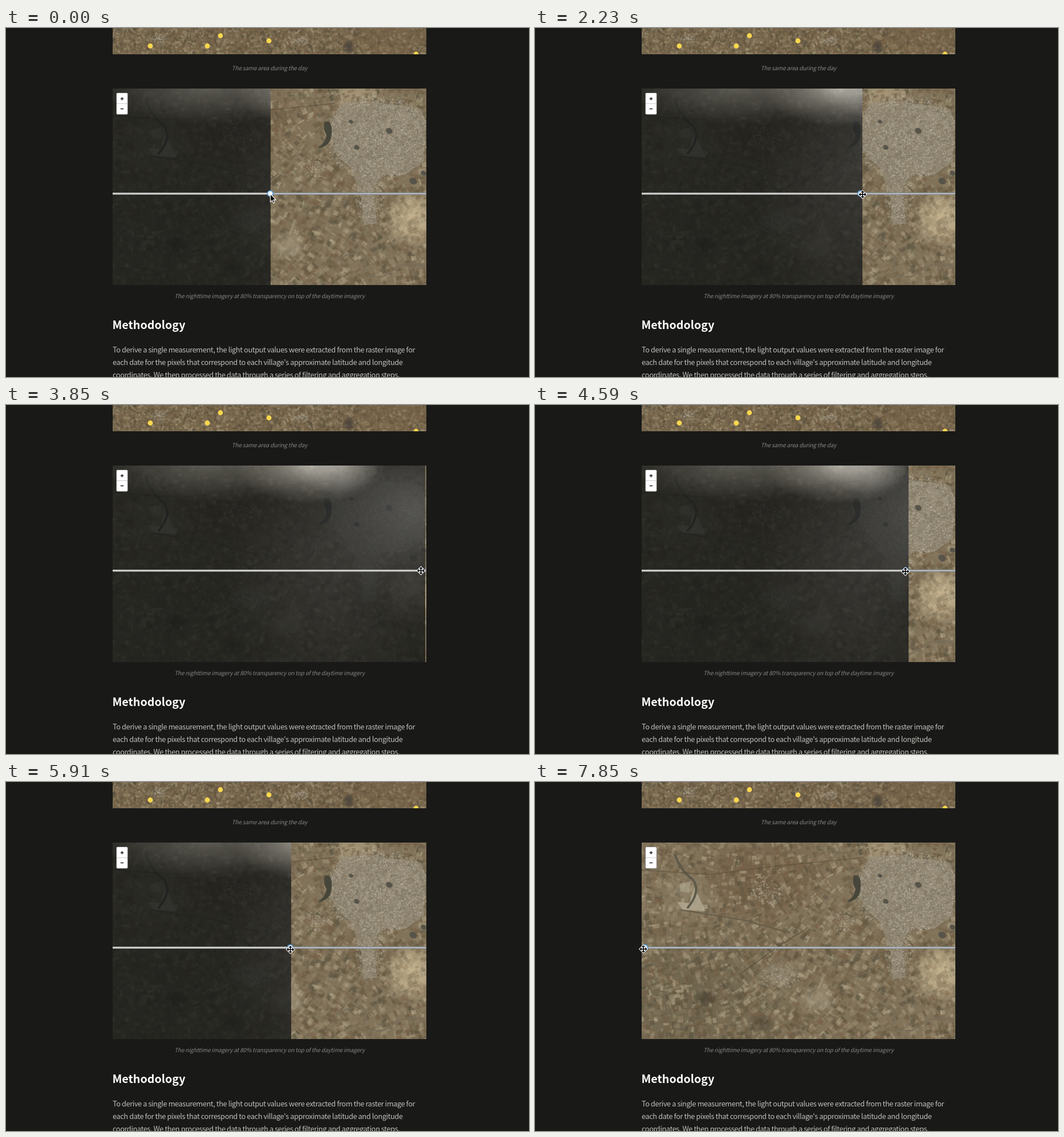
An HTML page with a canvas that plays this animation: 917 px wide and 611 px high, repeating every 8000 ms.

```html
<!DOCTYPE html>
<html lang="en">
<head>
<meta charset="utf-8">
<title>Imagery comparison</title>
<style>
html, body { margin: 0; width: 100%; height: 100%; overflow: hidden; background: #191917; }
canvas, #night, svg { position: absolute; }
#strip { left: 187px; top: 0; }
#day, #night { left: 187px; top: 106px; width: 550px; height: 344px; }
#night {
  opacity: .8;
  background:
    radial-gradient(80px 56px at 390px -6px, rgba(255,255,250,.45), rgba(255,255,250,.2) 50%, transparent),
    radial-gradient(135px 72px at 345px -4px, rgba(215,212,205,.8), rgba(190,187,180,.4) 50%, transparent),
    radial-gradient(190px 68px at 170px -4px, rgba(140,140,135,.55), rgba(110,110,106,.3) 60%, transparent),
    radial-gradient(190px 170px at 530px 80px, rgba(92,93,95,.72), rgba(80,80,82,.35) 55%, transparent),
    radial-gradient(180px 220px at 380px 180px, rgba(70,70,72,.4), transparent),
    #131616;
}
svg { left: 0; top: 0; }
text { font-family: "Noto Sans CJK SC", "Noto Sans CJK JP", "Noto Sans", sans-serif; }
.caption { font-size: 10px; letter-spacing: -.17px; font-style: italic; fill: #858580; text-anchor: middle; }
.body { font-size: 12.8px; letter-spacing: -.42px; font-weight: 300; fill: #bdbdb9; }
</style>
</head>
<body>
<canvas id="strip" width="550" height="46"></canvas>
<canvas id="day" width="550" height="344"></canvas>
<div id="night"></div>
<svg width="917" height="611" viewBox="0 0 917 611">
  <clipPath id="stripBox"><rect x="187" width="550" height="46"/></clipPath>
  <clipPath id="trackBox"><rect x="187" y="280" width="549.5" height="20"/></clipPath>
  <g id="villages" fill="#fad84f" clip-path="url(#stripBox)"></g>

  <text class="caption" x="462" y="73.5">The same area during the day</text>
  <text class="caption" x="462" y="472.5">The nighttime imagery at 80% transparency on top of the daytime imagery</text>
  <text x="186.5" y="527" font-size="19.7" font-weight="700" fill="#fff">Methodology</text>
  <g class="body">
    <text x="187" y="568">To derive a single measurement, the light output values were extracted from the raster image for</text>
    <text x="187" y="590">each date for the pixels that correspond to each village's approximate latitude and longitude</text>
    <text x="187" y="612">coordinates. We then processed the data through a series of filtering and aggregation steps.</text>
  </g>

  <rect x="193.5" y="113.5" width="20" height="38" rx="2" fill="#fff" stroke="#000" stroke-opacity=".35"/>
  <path d="M194 132.5h19" stroke="#ccc"/>
  <path d="M200.8 123.8h5.4M203.5 121.1v5.4M200.8 141.5h5.4" stroke="#222" stroke-width="1.5"/>

  <g clip-path="url(#trackBox)">
    <rect x="187" y="288" width="550" height="4" fill="#8e8e8c"/>
    <rect x="187" y="289" width="550" height="2" fill="#d2d2d0"/>
    <g id="rest">
      <rect y="288" width="550" height="4" fill="#85888b"/>
      <rect y="289" width="550" height="2" fill="#b4bac2"/>
    </g>
  </g>
  <g id="thumb">
    <circle r="6" fill="#4f93d6" opacity=".55"/>
    <circle id="knob" r="4.6" stroke="#5b9fe0" stroke-width="1.2"/>
  </g>
  <path id="arrow" d="M463.5 290.5v14.2l3.2-3 2.1 4.9 2.3-1-2.1-4.7h4.3z" fill="#000" stroke="#fff" stroke-width="1.1"/>
  <path id="move" d="M-6.6 0l3.2-3.2v2.4h2.6v-2.6h-2.4L0-6.6l3.2 3.2H.8v2.6h2.6v-2.4L6.6 0 3.4 3.2V.8H.8v2.6h2.4L0 6.6l-3.2-3.2h2.4V.8h-2.6v2.4z"
    fill="#000" stroke="#fff" stroke-width="2" paint-order="stroke"/>
</svg>
<script>
const $ = id => document.getElementById(id);

function random(seed) {
  return () => (seed = seed * 16807 % 2147483647) / 2147483647;
}

function fields(g, w, h, count, size, colors, seed) {
  const rnd = random(seed);
  for (let i = 0; i < count; i++) {
    const x = rnd() * w, y = rnd() * h;
    const turn = .45 * Math.sin(x / 90 + 1) + .4 * Math.cos(y / 70) - .35;
    const a = size * (.4 + rnd()), b = size * (.25 + rnd() * .6);
    g.save();
    g.translate(x, y);
    g.rotate(turn + (rnd() < .5 ? Math.PI / 2 : 0));
    g.globalAlpha = .2 + rnd() * .4;
    g.fillStyle = colors[Math.floor(rnd() * colors.length)];
    g.fillRect(-a / 2, -b / 2, a, b);
    g.restore();
  }
}

// Small marks, denser towards the middle of an ellipse.
function speckle(g, x, y, rx, ry, count, colors, seed) {
  const rnd = random(seed);
  g.globalAlpha = .45;
  for (let i = 0; i < count; i++) {
    const a = rnd() * 6.283, r = Math.pow(rnd(), .6);
    g.fillStyle = colors[Math.floor(rnd() * colors.length)];
    g.fillRect(x + r * rx * Math.cos(a), y + r * ry * Math.sin(a), 1 + rnd() * 2, 1 + rnd() * 1.6);
  }
  g.globalAlpha = 1;
}

function glow(g, x, y, rx, ry, rgb, alpha) {
  g.save();
  g.translate(x, y);
  g.scale(rx, ry);
  const grad = g.createRadialGradient(0, 0, 0, 0, 0, 1);
  grad.addColorStop(0, `rgba(${rgb},${alpha})`);
  grad.addColorStop(.5, `rgba(${rgb},${alpha * .7})`);
  grad.addColorStop(1, `rgba(${rgb},0)`);
  g.fillStyle = grad;
  g.fillRect(-1, -1, 2, 2);
  g.restore();
}

function line(g, d, color, width) {
  g.strokeStyle = color;
  g.lineWidth = width;
  g.stroke(new Path2D(d));
}

function shape(g, d, color) {
  g.fillStyle = color;
  g.fill(new Path2D(d));
}

function drawDay() {
  const g = $('day').getContext('2d');
  g.fillStyle = '#81735a';
  g.fillRect(0, 0, 550, 344);
  glow(g, 60, 270, 260, 150, '92,86,66', .5);
  glow(g, 210, 60, 130, 80, '104,78,54', .5);
  glow(g, 525, 228, 52, 56, '205,187,150', .8);
  glow(g, 425, 10, 50, 34, '190,174,140', .6);
  fields(g, 550, 344, 5200, 10, ['#64573f', '#705f46', '#87775c', '#9c8f73', '#57513f', '#b3a78a', '#765e45'], 71);
  glow(g, 85, 95, 55, 48, '160,150,124', .35);
  glow(g, 240, 232, 42, 26, '172,162,140', .45);
  glow(g, 307, 276, 36, 28, '172,160,136', .6);
  glow(g, 112, 273, 24, 16, '66,60,46', .6);
  glow(g, 211, 318, 24, 18, '66,58,44', .55);
  glow(g, 525, 228, 46, 48, '205,187,150', .45);

  shape(g, 'M400 26L455 22L540 36L550 60L545 128L512 152L470 150L456 180L464 235L440 240L436 190L418 140L390 112L378 74Z', 'rgba(154,145,129,.6)');
  const town = ['#b8b1a3', '#a49b8b', '#857c6c', '#6c6858', '#c1b9ab'];
  speckle(g, 464, 84, 92, 74, 3600, town, 19);
  speckle(g, 450, 190, 24, 56, 600, town, 23);
  speckle(g, 218, 82, 30, 26, 260, town, 29);
  speckle(g, 352, 138, 22, 18, 120, town, 31);
  speckle(g, 240, 234, 36, 22, 200, town, 37);

  shape(g, 'M92 78L112 120L72 118L62 104L84 106Z', 'rgba(190,182,160,.65)');
  shape(g, 'M66 72L86 68L84 88L68 86Z', 'rgba(186,178,154,.5)');
  line(g, 'M58 20Q68 50 90 65Q105 85 80 115', '#5f5a49', 4);
  line(g, 'M70 118L180 136L260 158', '#655d48', 2);
  line(g, 'M0 48L120 56L230 42L390 26', 'rgba(85,75,56,.6)', 1.5);
  line(g, 'M170 232L235 185L290 150', 'rgba(80,74,58,.6)', 2);
  line(g, 'M392 300C415 288 445 280 444 303S425 325 470 330C490 325 495 308 520 307S545 312 550 316', '#776d59', 2.5);
  shape(g, 'M372 58Q385 54 384 76Q384 102 360 104Q374 94 375 82Q368 70 372 58Z', '#47463a');
  g.fillStyle = '#57544a';
  for (const [x, y, r] of [[485, 74, 6], [428, 103, 5], [527, 162, 7], [418, 58, 4], [545, 148, 5]]) {
    g.beginPath();
    g.ellipse(x, y, r, r * .8, .5, 0, 7);
    g.fill();
  }
}

function drawStrip() {
  const g = $('strip').getContext('2d');
  g.fillStyle = '#77674d';
  g.fillRect(0, 0, 550, 46);
  fields(g, 550, 46, 2400, 6, ['#5d4f39', '#6a5a42', '#87775a', '#978a6b', '#755d43', '#4f4a3b', '#aa9d80'], 43);
  glow(g, 480, 20, 90, 40, '116,92,66', .35);
  const huts = ['#a8a092', '#8c8474', '#b7ae9e'];
  speckle(g, 82, 18, 14, 9, 80, huts, 3);
  speckle(g, 330, 22, 13, 9, 80, huts, 5);
  glow(g, 414, 33, 10, 14, '72,66,58', .9);
}

drawDay();
drawStrip();
$('villages').innerHTML = [[253, 31.5], [353, 31.5], [376, 13.5], [461, 22.5], [719, 46]]
  .map(([x, y]) => `<circle cx="${x}" cy="${y}" r="4.4"/>`).join('');

const LOOP = 8000, LEFT = 187, WIDTH = 550, THUMB = 13;

// Drag bursts: first time, last time, divider positions spread between them.
const bursts = [
  [0, 0, 464],
  [600, 740, 464, 464],
  [1040, 2080, 467, 474, 484, 498, 514, 530, 546, 560],
  [2230, 3260, 574, 592, 613, 636, 657.5, 673, 684, 693],
  [3410, 4440, 708, 723, 732, 735, 737, 730, 707, 680],
  [4590, 5180, 655, 622, 588, 562, 550],
  [5480, 6360, 545, 528, 500, 462, 420, 380, 346],
  [6650, 7550, 341, 322, 297, 270, 243, 215, 191],
  [7700, 7850, 188, 187]
];
const steps = bursts.flatMap(([from, to, ...xs]) => xs.map((x, i) => ({
  t: Math.floor((from + (to - from) * i / Math.max(1, xs.length - 1)) / 10) * 10, x
})));

// Pointer offset from the thumb: time, dx, y.
const offsets = [
  [600, -4, 290], [1480, 3, 290], [2820, 3, 292.5], [3850, -1, 290], [5180, -1, 292.5],
  [6360, 0, 294], [6650, -15, 295], [6800, -8, 295], [7550, -1, 293], [7850, -3.5, 292.5]
];

function offsetAt(t) {
  const i = offsets.findIndex(o => o[0] >= t);
  if (i <= 0) return offsets[0];
  const a = offsets[i - 1], b = offsets[i], k = (t - a[0]) / (b[0] - a[0]);
  return a.map((v, n) => v + (b[n] - v) * k);
}

function show(now) {
  const time = now % LOOP;
  const { t, x } = steps.findLast(s => s.t <= time);
  const thumb = LEFT + THUMB / 2 + (x - LEFT) / WIDTH * (WIDTH - THUMB);
  const [, dx, y] = offsetAt(t);
  $('night').style.clipPath = `inset(0 ${LEFT + WIDTH - x}px 0 0)`;
  $('rest').setAttribute('transform', `translate(${thumb})`);
  $('thumb').setAttribute('transform', `translate(${thumb - .6} 289.7)`);
  $('knob').setAttribute('fill', t < 740 ? '#f4f8fc' : '#cfd8e0');
  $('arrow').style.display = t < 600 ? '' : 'none';
  $('move').style.display = t < 600 ? 'none' : '';
  $('move').setAttribute('transform', `translate(${thumb + dx} ${y})`);
}

const start = performance.now();
function tick() {
  show(performance.now() - start);
  requestAnimationFrame(tick);
}
tick();
</script>
</body>
</html>
```
